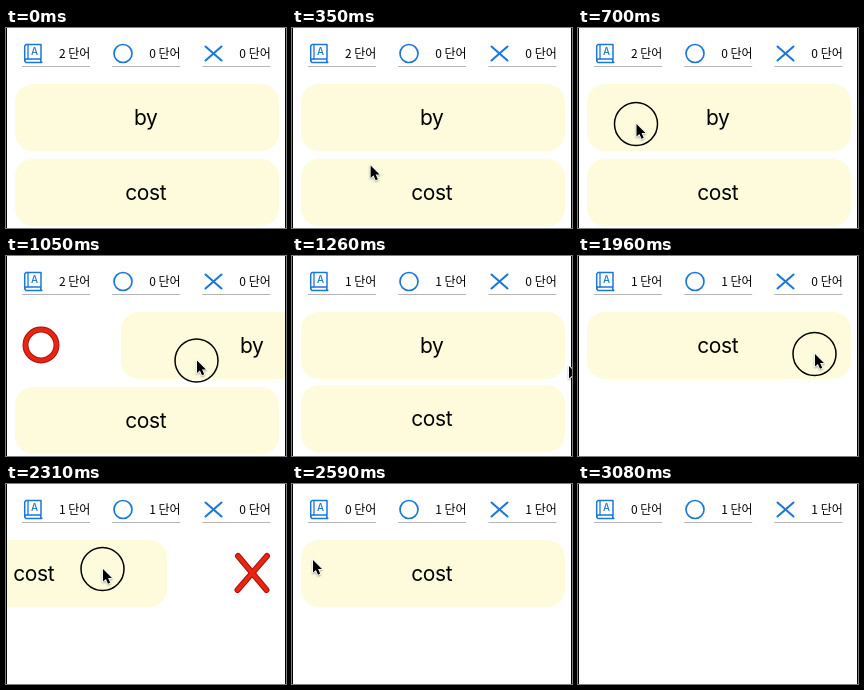
These frames come from a looping animation (280x200 px, 3500 ms). An HTML page with a canvas:

```html
<!DOCTYPE html>
<html lang="ko">
<head>
<meta charset="utf-8">
<title>단어 카드</title>
<style>
  html, body { margin: 0; width: 100%; height: 100%; overflow: hidden; background: #fff; }
  canvas { display: block; width: 280px; height: 200px; }
</style>
</head>
<body>
<canvas id="stage"></canvas>
<script>
const W = 280, H = 200, LOOP = 3500, STEP = 70;
const BLUE = '#1b78d8', CARD = '#fdfbdb', INK = '#000';
const ROW = 75, CARD_TOP = 56;
const canvas = document.getElementById('stage');
const ctx = canvas.getContext('2d');
const scale = window.devicePixelRatio || 1;
canvas.width = W * scale;
canvas.height = H * scale;

const clamp = v => Math.max(0, Math.min(1, v));
const mix = (a, b, k) => a + (b - a) * k;
const span = (t, from, to) => clamp((t - from) / (to - from));
const ease = {
  both: k => k * k * (3 - 2 * k),
  start: k => Math.pow(k, 1.5),
  end: k => 1 - (1 - k) * (1 - k)
};

// Pointer path: time, x, y, easing used to get there
const path = [
  [0, 112, 206, 'both'],
  [600, 58.5, 96, 'both'],
  [770, 58.5, 96, 'both'],
  [1260, 277, 110, 'both'],
  [1400, 277.5, 114, 'both'],
  [1540, 273, 118, 'both'],
  [1890, 237, 98, 'both'],
  [2030, 237, 98, 'both'],
  [2310, 97, 85, 'start'],
  [2590, 21, 76, 'end'],
  [3080, 58, 206, 'both'],
  [LOOP, 58, 206, 'both']
];

function pointerAt(t) {
  const i = Math.max(1, path.findIndex(p => p[0] > t));
  const a = path[i - 1], b = path[i];
  const k = ease[b[3]](span(t, a[0], b[0]));
  return { x: mix(a[1], b[1], k), y: mix(a[2], b[2], k) };
}

// A drag moves the card with the pointer, then the card springs back
function dragOffset(t, from, release) {
  if (t < from) return 0;
  const x0 = pointerAt(from).x;
  const pull = (pointerAt(Math.min(t, release)).x - x0) * 0.8;
  return pull * (1 - ease.end(span(t, release, release + 70)));
}

function line(points, color, width) {
  ctx.beginPath();
  points.forEach(([x, y], i) => i ? ctx.lineTo(x, y) : ctx.moveTo(x, y));
  ctx.strokeStyle = color;
  ctx.lineWidth = width;
  ctx.stroke();
}

function ring(x, y, r, color, width) {
  ctx.beginPath();
  ctx.arc(x, y, r, 0, Math.PI * 2);
  ctx.strokeStyle = color;
  ctx.lineWidth = width;
  ctx.stroke();
}

function text(str, x, y, font, color, align, spacing = 0) {
  ctx.font = font;
  ctx.fillStyle = color;
  ctx.textAlign = align;
  ctx.letterSpacing = spacing + 'px';
  ctx.fillText(str, x, y);
  ctx.letterSpacing = '0px';
}

function bookIcon() {
  ctx.lineJoin = 'round';
  line([[35, 31], [35, 16.5], [20, 16.5], [18.7, 18], [18.7, 33],
        [20, 34.5], [35.8, 34.5], [34.6, 32.8], [35, 31], [20, 31], [18.7, 32.5]], BLUE, 1.5);
  line([[22, 16.5], [22, 31]], BLUE, 1.3);
  text('A', 28.5, 27.4, '500 10px Inter, sans-serif', BLUE, 'center');
}

function header(t) {
  const first = t >= 1190, second = t >= 2520;
  const counts = [2 - first - second, +first, +second];
  counts.forEach((n, i) => {
    const x = 16 + i * 90.2;
    ctx.fillStyle = '#b4b4b4';
    ctx.fillRect(x, 38, 68, 1);
    text(n + ' 단어', x + 68.4, 29.5, '12px "Noto Sans CJK KR", "Noto Sans CJK", sans-serif', INK, 'right');
  });
  bookIcon();
  ring(117, 25.5, 9, BLUE, 1.7);
  line([[199.5, 18.5], [215.5, 32.5]], BLUE, 2.1);
  line([[215.5, 18.5], [199.5, 32.5]], BLUE, 2.1);
}

function card(word, dx, top, alpha = 1) {
  if (alpha <= 0) return;
  ctx.globalAlpha = alpha;
  ctx.fillStyle = CARD;
  ctx.beginPath();
  ctx.roundRect(9 + dx, top, 264, 67, 18);
  ctx.fill();
  text(word, 139.7 + dx, top + 41.3, '21px Inter, "Liberation Sans", sans-serif', INK, 'center', -0.4);
  ctx.globalAlpha = 1;
}

function rightMark() {
  ring(35, 89, 15.5, '#a9150c', 6);
  ring(35, 89, 15.5, '#ea2412', 4);
}

function wrongMark() {
  for (const [color, width] of [['#a9150c', 6], ['#ea2412', 4]]) {
    line([[232, 72], [260.5, 106]], color, width);
    line([[261, 72], [231.5, 106]], color, width);
  }
}

function pointer({ x, y }, pressed) {
  if (pressed) ring(x - 0.5, y, 21.5, INK, 1.5);
  ctx.save();
  ctx.translate(x, y);
  ctx.beginPath();
  [[0, 0], [0, 12.5], [2.9, 9.9], [5, 14.8], [7.2, 13.8], [5.1, 9.1], [9, 9]]
    .forEach(([px, py]) => ctx.lineTo(px, py));
  ctx.closePath();
  ctx.lineJoin = 'round';
  ctx.strokeStyle = '#fff';
  ctx.lineWidth = 1.6;
  ctx.shadowColor = 'rgba(0,0,0,.35)';
  ctx.shadowBlur = 2 * scale;
  ctx.shadowOffsetY = scale;
  ctx.stroke();
  ctx.shadowColor = 'transparent';
  ctx.fillStyle = INK;
  ctx.fill();
  ctx.restore();
}

function draw(t) {
  ctx.setTransform(scale, 0, 0, scale, 0, 0);
  ctx.fillStyle = '#fff';
  ctx.fillRect(0, 0, W, H);
  ctx.lineCap = 'round';
  header(t);

  const right = dragOffset(t, 770, 1190);
  const left = dragOffset(t, 2030, 2470);
  if (right > 0) rightMark();
  if (left < 0) wrongMark();

  const rise = ease.both(span(t, 1230, 1550));
  card('by', right, CARD_TOP, 1 - span(t, 1260, 1500));
  card('cost', left, CARD_TOP + ROW * (1 - rise), 1 - ease.both(span(t, 2590, 2900)));

  ctx.fillStyle = INK;
  ctx.fillRect(0, 0, 1, H);
  ctx.fillRect(W - 1, 0, 1, H);

  const pressed = (t >= 700 && t < 1190) || (t >= 1960 && t < 2470);
  if (t > 0 && t < 3080) pointer(pointerAt(t), pressed);
}

const begin = performance.now();
function tick() {
  const t = (performance.now() - begin) % LOOP;
  draw(Math.floor(t / STEP) * STEP);
  requestAnimationFrame(tick);
}
tick();
</script>
</body>
</html>
```
